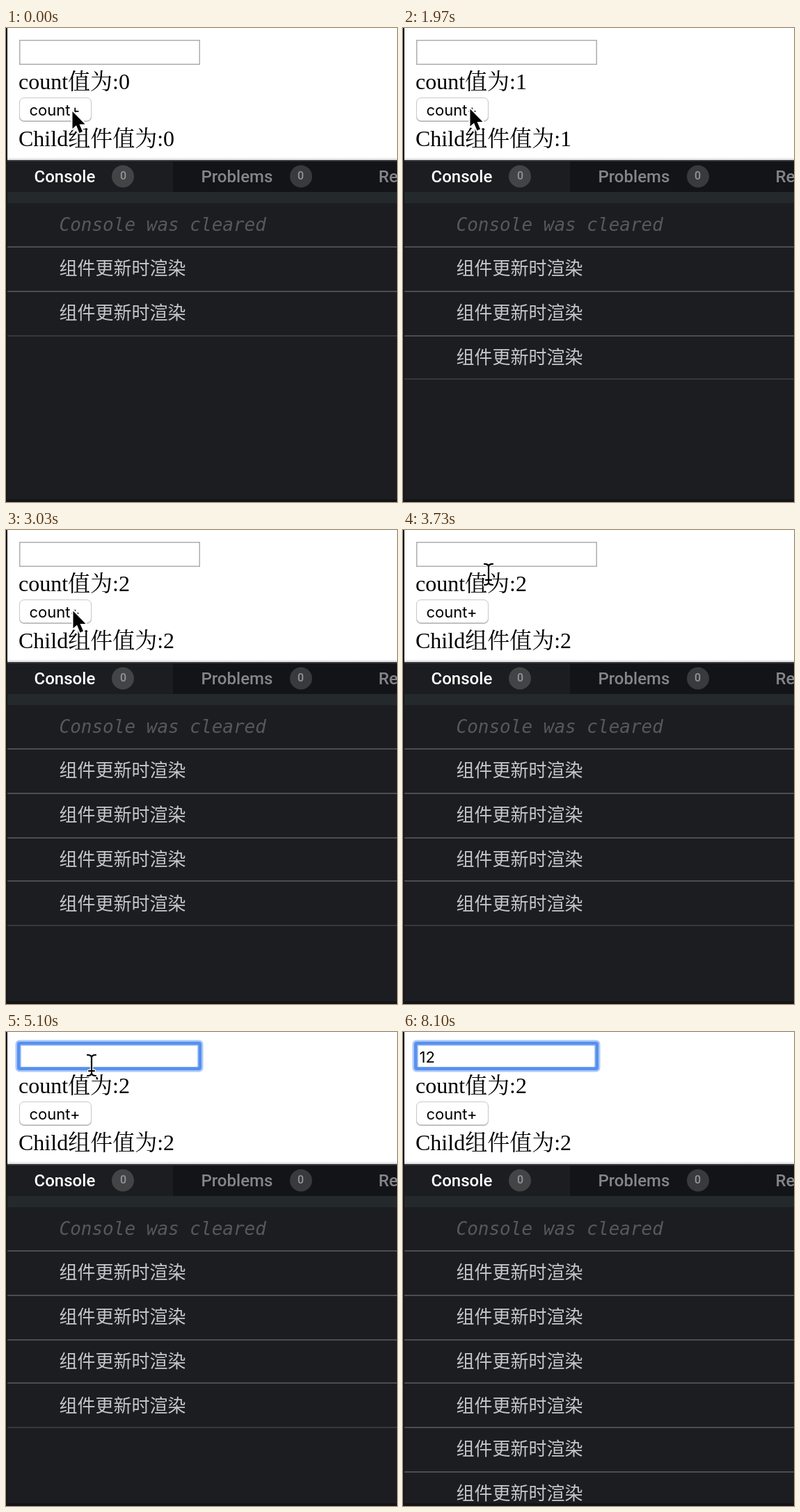
An HTML page for the animation above (8.43 s loop, 562 by 682 pixels).

```html
<!DOCTYPE html>
<html lang="zh-CN">
<head>
<meta charset="utf-8">
<title>count</title>
<style>
html, body { margin: 0; width: 100%; height: 100%; overflow: hidden; background: #fff; }
svg { display: block; width: 562px; height: 682px; }
.page { font: 32px "Liberation Serif", "Noto Serif CJK SC", "Noto Sans CJK SC", serif; }
.ui { font: 22px Inter, sans-serif; }
.tab { font: 500 24px Roboto, sans-serif; fill: #85868a; }
.badge { font: 500 16px Roboto, sans-serif; fill: #939598; text-anchor: middle; }
.note { font: italic 26px "DejaVu Sans Mono", monospace; fill: #56585c; }
.log { font: 26px "Noto Sans CJK SC", "Noto Sans CJK", sans-serif; fill: #c6c7c9; }
</style>
</head>
<body>
<svg viewBox="0 0 562 682">
  <defs>
    <linearGradient id="shade" x2="0" y2="1">
      <stop stop-color="#fff"/><stop offset="1" stop-color="#d8d8d8"/>
    </linearGradient>
  </defs>
  <rect width="562" height="682" fill="#fff"/>

  <rect x="19.75" y="17.75" width="258.5" height="34.5" fill="#fff" stroke="#adadad" stroke-width="1.5"/>
  <g id="ring">
    <rect x="13.5" y="11.5" width="270" height="46" rx="6" fill="#a9c8fa"/>
    <rect x="16" y="14" width="265" height="41" rx="4" fill="#5790ee"/>
    <rect x="20.5" y="18.5" width="256" height="32" rx="1" fill="#b4cdf8"/>
    <rect x="22" y="20" width="253" height="30" fill="#fff"/>
  </g>
  <text id="typed" class="ui" x="23.5" y="44" font-weight="500"></text>
  <rect id="caret" y="23" width="2" height="25"/>

  <text id="count" class="page" x="18" y="88"></text>
  <rect x="19" y="101" width="104" height="34" rx="7" fill="#b9b9b9"/>
  <rect x="19.5" y="100.5" width="103" height="33" rx="6.5" fill="#fff" stroke="#c8c8c8"/>
  <text class="ui" x="33.5" y="126">count+</text>
  <text id="child" class="page" x="18" y="170"></text>

  <rect y="186" width="562" height="4" fill="url(#shade)"/>
  <rect y="190" width="562" height="492" fill="#1c1d20"/>
  <rect x="240" y="190" width="322" height="46" fill="#131418"/>
  <rect y="190" width="562" height="2" fill="#35363a"/>
  <rect y="236" width="562" height="16" fill="#24292b"/>
  <text class="tab" x="40.5" y="222" style="fill:#fff">Console</text>
  <text class="tab" x="280.5" y="222">Problems</text>
  <text class="tab" x="535.5" y="222">Re</text>
  <circle cx="168" cy="213.5" r="16" fill="#424446"/>
  <circle cx="424" cy="213.5" r="16" fill="#393a3e"/>
  <text class="badge" x="168.5" y="218">0</text>
  <text class="badge" x="423.5" y="218">0</text>
  <text class="note" x="76.5" y="292">Console was cleared</text>
  <g id="logs"></g>
  <rect y="678" width="562" height="4" fill="#131418"/>
  <rect width="2" height="682" fill="#17181a"/>

  <path id="arrow" d="M0 0V25L5.5 20L10 31L14.5 29L10 18.5H18Z" stroke="#fff" stroke-width="4" stroke-linejoin="round" paint-order="stroke"/>
  <g id="beam" fill="none" stroke-linecap="round">
    <path id="stem" d="M-6-15Q0-15 0-11V11Q0 15-6 15M6-15Q0-15 0-11M6 15Q0 15 0 11M-4 8H4" stroke="#fff" stroke-width="4.5"/>
    <use href="#stem" style="stroke:#000"/>
    <path d="M-6-15Q0-15 0-11V11Q0 15-6 15M6-15Q0-15 0-11M6 15Q0 15 0 11M-4 8H4" stroke="#000" stroke-width="2.2"/>
  </g>
</svg>
<script>
const LOOP = 8430;
const $ = id => document.getElementById(id);
$("beam").querySelector("use").remove();

const clicks = [1970, 2870], keys = [5470, 6470], focus = 4470;
// time, x, y of the pointer
const path = [
  [0, 95.5, 120], [1200, 95.5, 120], [1270, 98, 116.5], [1500, 98, 116.5],
  [1600, 96.5, 116.5], [3400, 96.5, 116.5], [3730, 123, 64], [4200, 123, 48], [LOOP, 123, 48]
];

const passed = (times, t) => times.filter(s => t >= s).length;
const show = (id, on) => $(id).setAttribute("visibility", on ? "visible" : "hidden");

function pointer(t) {
  const i = path.findIndex(p => p[0] > t);
  const [t0, x0, y0] = path[i - 1], [t1, x1, y1] = path[i];
  const k = (t - t0) / (t1 - t0);
  return [x0 + (x1 - x0) * k, y0 + (y1 - y0) * k];
}

function line(y, color) {
  return `<rect y="${y - 1}" width="562" height="2" fill="${color}"/>`;
}

function logs(n) {
  let out = "";
  for (let i = 0; i <= n; i++) {
    out += line(315 + 64 * i - (i > 2 ? 2 : 0), i < n ? "#4c4d50" : "#37383b");
    if (i < n) out += `<text class="log" x="76.5" y="${354.5 + 64 * i - (i > 3 ? 2 : 0)}">组件更新时渲染</text>`;
  }
  return out;
}

let state = "";
function draw(now) {
  const t = now % LOOP;
  const count = passed(clicks, t), chars = passed(keys, t);

  if (state !== `${count},${chars}`) {
    state = `${count},${chars}`;
    $("count").textContent = "count值为:" + count;
    $("child").textContent = "Child组件值为:" + count;
    $("typed").textContent = "12".slice(0, chars);
    $("logs").innerHTML = logs(2 + count + chars);
    $("caret").setAttribute("x", [23, 34, 48][chars]);
  }

  show("ring", t >= focus);
  show("caret", t >= focus && (t - focus) % 1000 < 500);

  const [x, y] = pointer(t), overText = y < 97;
  for (const id of ["arrow", "beam"]) $(id).setAttribute("transform", `translate(${x} ${y})`);
  show("arrow", !overText);
  show("beam", overText && !chars);
  requestAnimationFrame(draw);
}
requestAnimationFrame(draw);
</script>
</body>
</html>
```
